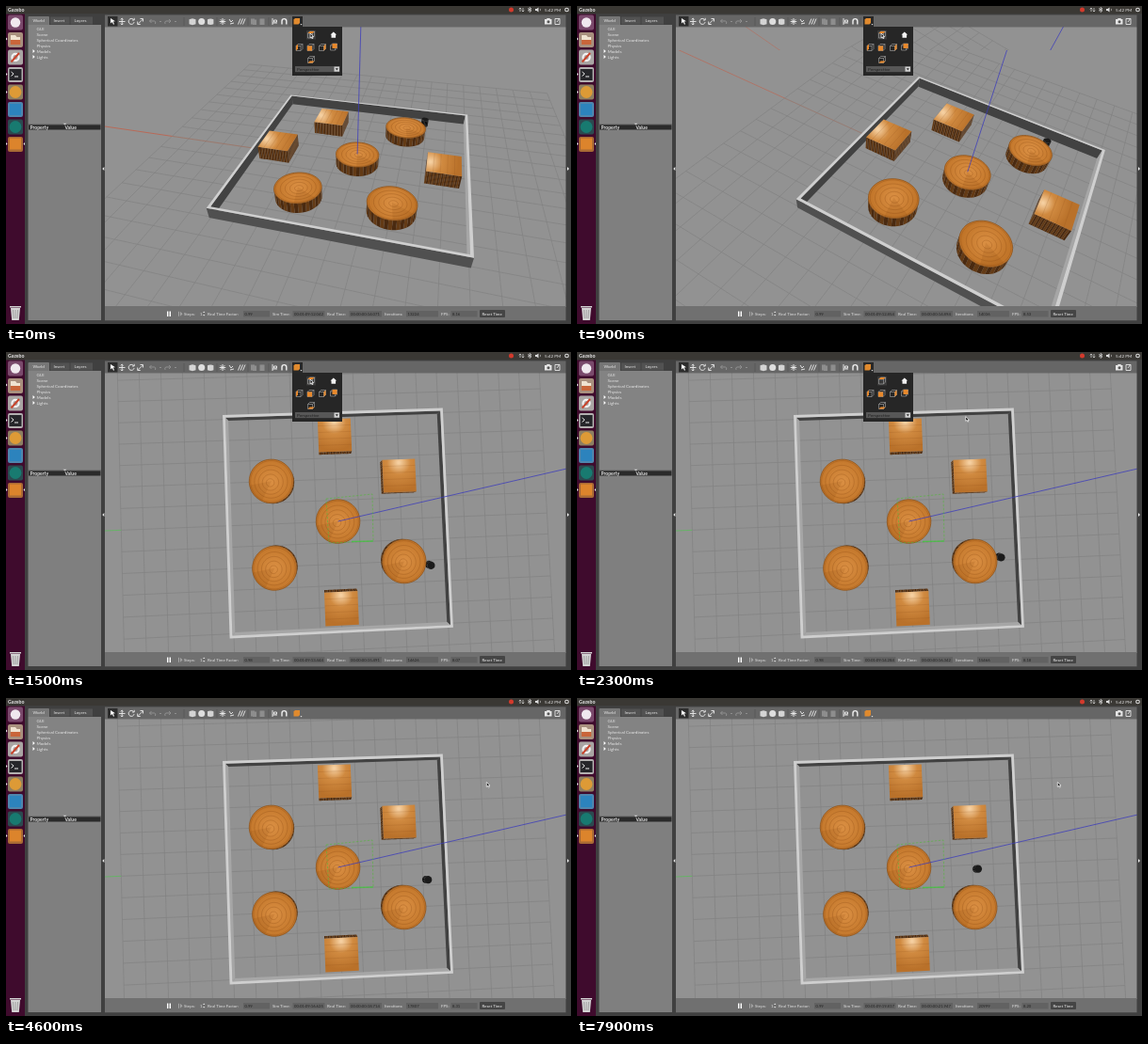
Write an HTML page with a canvas that moves like this. It is 600 px wide and 338 px high and loops after 8000 ms.

```html
<!DOCTYPE html>
<html lang="en">
<head>
<meta charset="utf-8">
<title>Robot arena simulation</title>
<style>
html, body { margin: 0; width: 100%; height: 100%; overflow: hidden; background: #404040; }
canvas, svg { position: absolute; left: 0; top: 0; width: 100%; height: 100%; display: block; }
text { font: 4.6px Lato, "Open Sans", sans-serif; fill: #e6e6e6; white-space: pre; }
.bold { font-weight: 700; font-size: 5px; }
.bar text { font-size: 4.4px; fill: #e0e0e0; }
.bar .num { font-size: 4.2px; fill: #222; }
</style>
</head>
<body>
<canvas id="view" width="600" height="338"></canvas>
<svg viewBox="0 0 600 338" preserveAspectRatio="none">
  <!-- desktop bar -->
  <rect width="600" height="8.5" fill="#3a3834"/>
  <text class="bold" x="2" y="6" style="font-size:5.2px">Gazebo</text>
  <circle cx="536.5" cy="4" r="2.5" fill="#d33a2c"/>
  <path d="M546 6V2m-1.3 1.3L546 2l1.3 1.3M549 2v4m-1.3-1.3L549 6l1.3-1.3M556 1.5v5l2-1.6-4-2.4m0 2.6 4-2.2-2-1.6" fill="none" stroke="#ddd" stroke-width=".7"/>
  <path d="M562 3h1.5l2-1.6v5.2l-2-1.6H562zM567 2.4q1.5 1.6 0 3.2" fill="#ddd"/>
  <text x="572" y="6">5:42 PM</text>
  <circle cx="595.5" cy="4" r="1.8" fill="none" stroke="#ddd" stroke-width="1.1"/>

  <!-- launcher -->
  <rect y="8.5" width="20" height="329.5" fill="#3f0b2d"/>
  <g id="tiles"></g>
  <circle cx="10" cy="17.5" r="5.2" fill="#f0e8ee"/>
  <path d="M5 31h5l1.5 2H15v7H5z" fill="#efe2d0"/>
  <path d="M4.8 36h10.4v5H4.8z" fill="#c9653a"/>
  <circle cx="10" cy="54.5" r="3.6" fill="none" stroke="#f2f2f2" stroke-width="2.2"/>
  <path d="M5.5 59.5 14 50" stroke="#c8442c" stroke-width="2"/>
  <rect x="3.5" y="67" width="13" height="12" fill="#26262a"/>
  <path d="M5.500 70l2.600 2.200-2.600 2.200M9 75h4" fill="none" stroke="#eee"/>
  <circle cx="10" cy="91.5" r="6.4" fill="#dd9a36"/>
  <rect x="4" y="104" width="12" height="12" fill="#2c83bd"/>
  <circle cx="10" cy="128.5" r="6.4" fill="#187a70"/>
  <rect x="4" y="140.5" width="12" height="12" fill="#dc842c"/>
  <path d="M5 321h10l-1.2 13H6.2zM4 319h12v1.5H4z" fill="#d4d4d4"/>
  <path d="M7.500 323l.5 9m2-9v9m2.500-9-.5 9" stroke="#888" stroke-width=".7"/>
  <path d="M0 33.5l1.5 1.5L0 36.5zM0 71l1.5 1.5L0 74zM0 90l1.5 1.5L0 93zM0 145l1.5 1.5L0 148zM20 145l-1.5 1.5L20 148z" fill="#eee"/>

  <!-- world panel -->
  <path d="M20 8.5h85V338H20z" fill="#404040"/>
  <rect x="23.5" y="20" width="77.5" height="105.500" fill="#838383"/>
  <rect x="23.5" y="125.500" width="77.5" height="208.500" fill="#7f7f7f"/>
  <rect x="24" y="126.300" width="76.500" height="5.200" fill="#2a2a2a"/>
  <path d="M23.5 20v-8q0-1 1-1H45q1 0 1 1v8z" fill="#767676"/>
  <path d="M47 19.5v-8h20.5v8zM68.5 19.5v-8H92v8z" fill="#525252"/>
  <path d="M60.5 124.8h4l-2 1.5z" fill="#ddd"/>
  <text x="28.5" y="16.8">World</text><text x="50.5" y="16.8">Insert</text><text x="72.5" y="16.8">Layers</text>
  <g id="tree"></g>
  <text class="bold" x="25.5" y="130.6">Property</text><text class="bold" x="62.5" y="130.6">Value</text>
  <path d="M104.3 171v4l-2-2z" fill="#eee"/>

  <!-- toolbar -->
  <path d="M105 8.5h495v13.8H105zM594.5 22h5.500v316h-5.500z" fill="#404040"/>
  <path d="M105 9.5h489.5V22H105z" fill="#666"/>
  <path d="M596 171v4l2-2z" fill="#eee"/>
  <rect x="108" y="11" width="10.5" height="10.5" fill="#2d2d2d"/>
  <path d="M111 13l5 3.2-2.2.4 1.2 2.600-1 .5-1.2-2.600-1.8 1.400z" fill="#fff"/>
  <g fill="none" stroke="#eee" stroke-width=".9">
    <path d="M120 16.5h6.5M123.2 13.3v6.5M121.8 14.4l1.4-1.4 1.4 1.4M121.8 18.6l1.4 1.4 1.4-1.4"/>
    <path d="M135.5 14.5a3 3 0 1 0 .6 2.6M136.2 12.8V15H134"/>
    <path d="M140.500 18.800l4.500-4.500M142.500 13.500h3v3M139.700 16.500v3h3"/>
    <path d="M152.500 16h5q2 .2 1 3M154.500 14l-2 2 2 2M175 16h-5q-2 .2-1 3M173 14l2 2-2 2" stroke="#939393"/>
    <path d="M163 16.5h2M179 16.5h2" stroke="#939393"/>
    <path d="M230 13v7M226.7 16.5h6.6M227.7 14.2l4.6 4.6M227.7 18.8l4.6-4.6"/>
    <path d="M237 14l2 3 2-2M238 19l4-1M246.5 19.5l2.5-6M249 19.5l2.5-6M251.5 19.5l2.5-6"/>
    <path d="M283 13v7M283 18h5M284.5 15h3v2h-3z"/>
    <path d="M293 19.500V16a2.400 2.400 0 0 1 4.800 0v3.500" stroke-width="1.4"/>
  </g>
  <path d="M194.5 14.2l3.5-1 3.5 1v5l-3.5 1-3.5-1zM214 14.2q3.2-1.6 6.4 0v5q-3.2 1.6-6.4 0z" fill="#d4d4d4"/>
  <circle cx="207.7" cy="16.6" r="3.5" fill="#dedede"/>
  <path d="M260 13.500h4v6h-4zM262 14.500h4V20h-4zM269.500 13.500h5V20h-5z" fill="#8d8d8d"/>
  <path d="M189 12v9M224 12v9M257 12v9M279 12v9M301 12v9" stroke="#555" stroke-width=".7"/>
  <path d="M572 14h2l.6-1h2.8l.6 1h1.5v5.5H572z" fill="#e5e5e5"/><circle cx="576" cy="16.7" r="1.5" fill="#555"/>
  <path d="M583 13.5h5v6h-5zM585 17l3-4" fill="none" stroke="#e5e5e5" stroke-width=".9"/>
  <rect id="press" x="304" y="11" width="11" height="11" fill="#282828"/>
  <path d="M305.5 14.5l1.5-1.5h5v5l-1.5 1.5h-5z" fill="#e08a2e"/><path d="M312.5 19h2l-1 1.5z" fill="#ddd"/>

  <!-- view angle popup -->
  <g id="popup">
    <rect x="304" y="22" width="53" height="52" fill="#262626"/>
    <rect x="319" y="26" width="10" height="9.5" fill="#393939"/>
    <g id="cubes"></g>
    <path d="M344.5 30.5l3.3-3 3.3 3h-1v3.2h-4.6v-3.2z" fill="#f2f2f2"/>
    <rect x="307" y="64" width="47.5" height="6.2" fill="#575757"/>
    <text x="309" y="68.7" style="fill:#202020">Perspective</text>
    <rect x="348.5" y="64.5" width="5.5" height="5.2" fill="#d0d0d0"/><path d="M349.8 66.3h3l-1.5 2z" fill="#222"/>
  </g>

  <!-- status bar -->
  <g class="bar">
    <path d="M105 319h489.500v15.500H105z" fill="#707070"/>
    <path d="M105 334.5h495v3.500H105z" fill="#404040"/>
    <path d="M171 324.5h1.400v5.500H171zM173.600 324.5h1.400v5.500h-1.400z" fill="#fff"/>
    <path d="M183 324.800h1v5h-1zM185 324.800l2.500 2.500-2.500 2.500z" fill="#a4a4a4"/>
    <path d="M209 326l1.2-1.5 1.2 1.5zM209 328l1.2 1.5 1.2-1.5z" fill="#ddd"/>
    <g id="fields"></g>
    <rect x="503" y="323" width="27" height="8" rx="1" fill="#454545"/>
    <text x="505.5" y="328.9" style="fill:#eee">Reset Time</text>
  </g>
  <path id="cursor" d="M0 0v4.800l1.200-1 .9 1.900.9-.4-.9-1.800h1.600z" fill="#111" stroke="#f4f4f4" stroke-width=".8"/>
</svg>
<script>
const LOOP = 8000;
const $ = id => document.getElementById(id);
const ctx = $('view').getContext('2d');

// ---- static interface parts ----
$('tiles').innerHTML = ['#7a4a6c', '#a8907e', '#a9a5a3', '#b3b0b0', '#8d7f62', '#4f86ad', '#2c4a50', '#a86a35']
  .map((c, i) => `<rect x="2" y="${9.5 + i * 18.5}" width="16" height="16" rx="2" fill="${c}"/>`).join('');
$('tree').innerHTML = ['GUI', 'Scene', 'Spherical Coordinates', 'Physics', 'Models', 'Lights']
  .map((s, i) => `<text x="32.5" y="${26 + i * 5.95}">${s}</text>` +
    (i > 3 ? `<path d="M28.5 ${22.3 + i * 5.95}l2.2 2-2.2 2z" fill="#fff"/>` : '')).join('');

const faces = {
  top: 'M-3.5-1.5l2-2h5l-2 2z', bottom: 'M-3.5 3.5l2-2h5l-2 2z', front: 'M-3.5-1.5h5v5h-5z',
  left: 'M-3.5-1.5l2-2v5l-2 2z', right: 'M1.5-1.5l2-2v5l-2 2z', back: 'M-1.5-3.5h5v5h-5z'
};
$('cubes').innerHTML = [[324, 30.5, 'top'], [311.5, 44, 'left'], [323.5, 44, 'front'], [336, 44, 'right'], [348, 43.5, 'back'], [324, 57, 'bottom']]
  .map(([x, y, f]) => `<g transform="translate(${x} ${y})"><path d="M-3.5-1.5h5v5h-5zl2-2h5v5l-2 2M1.5-1.5l2-2" fill="none" stroke="#a9a9a9" stroke-width=".6"/><path d="${faces[f]}" fill="#e8892c"/></g>`).join('');

$('fields').innerHTML = '<text x="189" y="328.9">Steps:</text><text x="206" y="328.9">1</text>' +
  [['Real Time Factor:', 214, 252, 28, 'rtf'], ['Sim Time:', 283, 304.5, 34, 'sim'], ['Real Time:', 341, 364.5, 34.5, 'real'],
   ['Iterations:', 402, 425, 34, 'iter'], ['FPS:', 462, 472.5, 28, 'fps']]
  .map(([label, x, fx, w, id]) => `<text x="${x}" y="328.9">${label}</text><rect x="${fx}" y="324" width="${w}" height="6.5" fill="#626262"/><text class="num" id="${id}" x="${fx + 1.5}" y="328.8"></text>`).join('');

// ---- timing ----
const clamp = v => Math.max(0, Math.min(1, v));

// Piecewise linear value from rows of [time, ...values]
function track(rows, t) {
  let i = 0;
  while (i < rows.length - 2 && t > rows[i + 1][0]) i++;
  const [a, b] = [rows[i], rows[i + 1]];
  const k = clamp((t - a[0]) / (b[0] - a[0]));
  return a.slice(1).map((v, j) => v + (b[j + 1] - v) * k);
}
const pointer = [[1900, 323, 29], [2700, 502, 108], [3100, 504.5, 104.5], [3700, 504.5, 104.5], [4300, 510.3, 89.5]];
const robotPath = [[0, 4.2, 2.87], [1500, 4.2, 2.2], [3200, 4.15, 1.42], [4600, 4.13, .74], [6500, 4.12, -.08],
  [6900, 3.92, -.14], [7400, 3.57, .02], [7900, 3.18, .2]];
const steps = [[0, 13224], [900, 14036], [1500, 14626], [3200, 16411], [4600, 17807], [6500, 19601], [7900, 20999]];
const fpsPath = [[0, 8.16], [900, 8.53], [1500, 8.07], [3200, 8.31], [4600, 8.31], [6500, 8.06], [7900, 8.2]];

// ---- camera: rim corners on screen, vertical vanishing point, depth per unit height ----
const poses = [
  [215, 214, 303, 95, 489, 116, 495, 266, 358, 710, -.0325],
  [235, 205, 363, 76, 559, 153, 502, 346, 290, 565, -.042],
  [231.5, 68.3, 462.5, 61, 473.5, 291.5, 239, 303, 340, 182.9, -.054]
];
const MID = .258;
function progress(t) {
  const p = clamp((t - 720) / 600);
  return -p * p * p + 1.5 * p * p + .5 * p;
}
function camera(s) {
  const k = [(s - MID) * (s - 1) / MID, s * (s - 1) / (MID * (MID - 1)), s * (s - MID) / (1 - MID)];
  const [x0, y0, x1, y1, x2, y2, x3, y3, nx, ny, vw] =
    poses[0].map((v, i) => v * k[0] + poses[1][i] * k[1] + poses[2][i] * k[2]);
  const ax = x1 - x2, bx = x3 - x2, cx = x0 - x1 + x2 - x3;
  const ay = y1 - y2, by = y3 - y2, cy = y0 - y1 + y2 - y3;
  const den = ax * by - bx * ay;
  const g = (cx * by - bx * cy) / den, h = (ax * cy - cx * ay) / den;
  const mid = 1 + (g + h) / 2;
  const project = (x, y, z = 0) => {
    const u = (x + 5) / 10, v = (y + 5) / 10;
    const w = (g * u + h * v + 1) / mid + z * vw;
    return [
      (((x1 - x0 + g * x1) * u + (x3 - x0 + h * x3) * v + x0) / mid + z * vw * nx) / w,
      (((y1 - y0 + g * y1) * u + (y3 - y0 + h * y3) * v + y0) / mid + z * vw * ny) / w, w];
  };
  project.vw = vw;
  return project;
}

// ---- drawing ----
const GROUND = -.55, WOOD_DARK = ['#4a2a10', '#633a15'];
const square = (r, x = 0, y = 0) => [[x - r, y - r], [x + r, y - r], [x + r, y + r], [x - r, y + r]];
const circle = (r, x, y, n = 40) => Array.from({ length: n }, (_, i) =>
  [x + r * Math.cos(i / n * 2 * Math.PI), y + r * Math.sin(i / n * 2 * Math.PI)]);
const lift = (P, pts, z) => pts.map(p => P(p[0], p[1], z));

function trace(pts, close = true) {
  pts.forEach((p, i) => i ? ctx.lineTo(p[0], p[1]) : ctx.moveTo(p[0], p[1]));
  if (close) ctx.closePath();
}
function fill(pts, color) {
  ctx.beginPath(); trace(pts);
  ctx.fillStyle = color; ctx.fill();
}
function stroke(pts, color, width, close = false) {
  ctx.beginPath(); trace(pts, close);
  ctx.strokeStyle = color; ctx.lineWidth = width; ctx.stroke();
}
const area = q => q.reduce((sum, p, i) => {
  const n = q[(i + 1) % q.length];
  return sum + p[0] * n[1] - n[0] * p[1];
}, 0);

// Visible vertical faces below a convex outline: seen from outside (sign -1) or inside (sign 1)
function skirt(P, base, top, bottom, sign, paint) {
  base.forEach((a, i) => {
    const b = base[(i + 1) % base.length];
    const quad = [P(...a, top), P(...b, top), P(...b, bottom), P(...a, bottom)];
    if (area(quad) * sign > 0) paint(quad, a, b, i);
  });
}

function log(P, x, y) {
  skirt(P, circle(1, x, y), 0, GROUND, -1, (q, a, b, i) => fill(q, WOOD_DARK[i % 2]));
  const c = P(x, y), shade = ctx.createRadialGradient(c[0], c[1], 2, c[0], c[1], 25);
  shade.addColorStop(0, '#d98e42');
  shade.addColorStop(1, '#c17529');
  const rim = circle(1, x, y);
  fill(lift(P, rim, 0), shade);
  fill(lift(P, [[x, y], ...rim.slice(13, 20)], 0), 'rgba(120,60,10,.13)');
  for (let r = .18; r < .95; r += .19)
    stroke(lift(P, circle(r, x - .06 * (1 - r), y + .08 * (1 - r)), 0), 'rgba(125,65,15,.3)', .8, true);
  stroke(lift(P, rim, 0), '#8f531b', .8, true);
}

function crate(P, x, y) {
  const top = .15, half = .75, base = square(half, x, y);
  skirt(P, base, top, GROUND, -1, (q, a, b) => {
    const at = k => [a[0] + (b[0] - a[0]) * k, a[1] + (b[1] - a[1]) * k];
    for (let i = 0; i < 20; i++) {
      const l = at(i / 20), r = at((i + 1) / 20);
      fill([P(...l, top), P(...r, top), P(...r, GROUND), P(...l, GROUND)], WOOD_DARK[i % 2]);
    }
  });
  const c = P(x, y - .6, top), shade = ctx.createRadialGradient(c[0], c[1], 1, c[0], c[1], 30);
  shade.addColorStop(0, '#f5cfa0');
  shade.addColorStop(.4, '#d08a40');
  shade.addColorStop(1, '#b9712a');
  fill(lift(P, base, top), shade);
  for (let i = 1; i < 5; i++) {
    const py = y - half + i * .3;
    stroke([P(x - half, py, top), P(x + half, py, top)], 'rgba(130,70,20,.25)', .6);
  }
}

function robot(P, x, y) {
  const ring = circle(.18, x, y, 16);
  skirt(P, ring, -.1, -.5, -1, q => fill(q, '#0c0c0c'));
  fill(lift(P, ring, -.1), '#1b1b1b');
}

const props = [[log, 0, 0], [log, -2.96, -1.95], [log, -2.95, 2], [log, 2.95, 1.95], [crate, 2.87, -1.97], [crate, 0, -3.93], [crate, 0, 3.93]];

function scene(s, t) {
  const P = camera(s);
  const ground = (x, y) => P(x, y, GROUND);
  ctx.fillStyle = '#929292';
  ctx.fillRect(105, 22, 490, 298);

  for (let i = -10; i <= 10; i++) {
    stroke([ground(i, -10), ground(i, 10)], '#828282', .7);
    stroke([ground(-10, i), ground(10, i)], '#828282', .7);
  }
  // ground axes fade with the grazing angle
  ctx.globalAlpha = 1 - s;
  stroke([ground(0, -5), ground(0, -10)], 'rgba(205,95,60,.45)', .7);
  stroke([ground(0, -10), ground(0, -40)], '#c2604a', .8);
  ctx.globalAlpha = 1;
  stroke([ground(-10, 0), ground(-16, 0)], '#55c055', .7);

  // the walls at the top and right are in shade, the two opposite ones are lit
  const inner = square(4.94), outer = square(5.06);
  skirt(P, inner, 0, GROUND, 1, (q, a, b, i) => fill(q, i < 2 ? '#424242' : '#a6a6a6'));
  props.concat([[robot, ...track(robotPath, t)]])
    .sort((a, b) => P(b[1], b[2])[2] - P(a[1], a[2])[2])
    .forEach(([draw, x, y]) => draw(P, x, y));
  skirt(P, outer, 0, GROUND, -1, (q, a, b, i) => fill(q, i % 2 ? '#505050' : '#474747'));
  ctx.beginPath();
  trace(lift(P, outer, 0));
  trace(lift(P, inner, 0));
  ctx.fillStyle = '#cfcfcf';
  ctx.fill('evenodd');

  // vertical axis, running almost to the height of the camera
  stroke([P(0, 0), P(0, 0, -.98 / P.vw)], '#3a3abc', .75);

  if (s > .9) {
    ctx.setLineDash([2.5, 1.5]);
    stroke([[340, 156], [389, 151], [390, 201], [343, 203]], '#55b83c', .6, true);
    ctx.setLineDash([]);
    stroke([[367, 201.3], [390, 201]], '#3ccc3c', .9);
  }
}

function clipped(y, h, draw) {
  ctx.save();
  ctx.beginPath();
  ctx.rect(105, y, 490, h);
  ctx.clip();
  draw();
  ctx.restore();
}

const clock = (prefix, ms) => prefix + (ms / 1000).toFixed(3).padStart(6, '0');

function frame(now) {
  const t = now % LOOP, s = progress(t);
  clipped(22, 298, () => scene(s, t));
  // torn refresh: the top strip is briefly ahead
  if (t >= 850 && t < 950) clipped(22, 25, () => scene(s + .17, t));

  const tick = Math.floor(t / 100) * 100;
  const count = Math.round(track(steps, tick)[0]);
  $('rtf').textContent = tick >= 1300 && tick < 4200 ? '0.98' : '0.99';
  $('sim').textContent = clock('00:01:09:', count - 1182);
  $('real').textContent = clock('00:00:00:', 14071 + (count - 13224) * 1.013);
  $('iter').textContent = count;
  $('fps').textContent = track(fpsPath, tick)[0].toFixed(2);

  const open = t < 4000 ? '' : 'none';
  $('popup').style.display = open;
  $('press').style.display = open;
  const [mx, my] = track(pointer, t);
  $('cursor').setAttribute('transform', `translate(${mx} ${my})`);
  requestAnimationFrame(frame);
}
requestAnimationFrame(frame);
</script>
</body>
</html>
```
